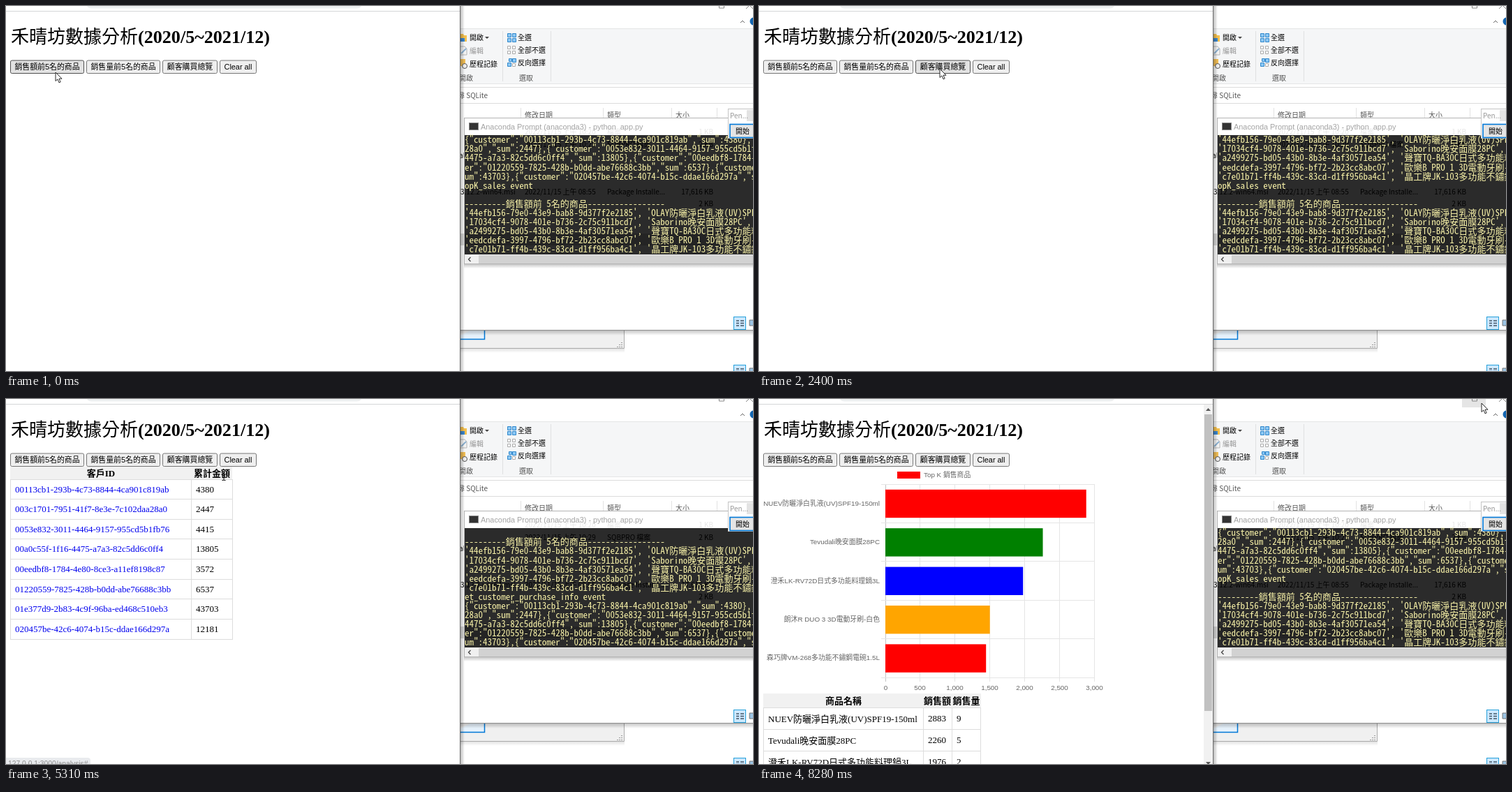
Animation, 1070 px wide and 523 px high, one loop 8.36 s. Source, as an HTML page:

```html
<!DOCTYPE html>
<html lang="zh-Hant">
<head>
<meta charset="utf-8">
<title>數據分析</title>
<style>
  html, body { margin: 0; width: 100%; height: 100%; overflow: hidden; background: #fff; }
  svg { display: block; width: 1070px; height: 523px; }
  text { white-space: pre; }
  .ui { font: 10px "Noto Sans CJK TC", "Noto Sans CJK", sans-serif; }
  .sans { font: 10.9px "Liberation Sans", "Noto Sans CJK TC", "Noto Sans CJK", sans-serif; }
  .axis { font: 9.85px "Liberation Sans", "Noto Sans CJK TC", "Noto Sans CJK", sans-serif; fill: #666; }
  .serif { font: 13px "Liberation Serif", "Noto Sans CJK TC", "Noto Sans CJK", serif; }
  .bold { font-weight: 700; }
  .mid { text-anchor: middle; }
  .end { text-anchor: end; }
  .term { font: 13.04px "Noto Sans Mono CJK TC", "Noto Sans Mono", monospace; fill: #f8f2a8; }
  .btn rect { fill: #efefef; stroke: #767676; }
  .btn.hover rect { fill: #e2e2e2; stroke: #4f4f4f; }
  .btn.active rect { fill: #f5f5f5; stroke: #8d8d8d; }
</style>
</head>
<body>
<svg id="stage" viewBox="0 0 1070 523" xmlns="http://www.w3.org/2000/svg">
  <defs>
    <linearGradient id="sideShade">
      <stop offset="0" stop-opacity=".3"/><stop offset="1" stop-opacity="0"/>
    </linearGradient>
    <linearGradient id="downShade" x2="0" y2="1">
      <stop offset="0" stop-opacity=".22"/><stop offset="1" stop-opacity="0"/>
    </linearGradient>
    <g id="viewIcon">
      <rect x=".5" y=".5" width="17" height="18" fill="#cce8ff" stroke="#26a0da"/>
      <path d="M4 6h4M4 9.500h4M4 13h4M10 6h5M10 9.500h5M10 13h5" stroke="#456" stroke-width="1.500"/>
      <path d="M23 5h9v8h-9z" fill="#9cc4e4" stroke="#777"/>
    </g>
  </defs>

  <!-- window behind -->
  <rect x="640" y="455" width="245" height="35" fill="#f0f0f0"/>
  <path d="M640 490.500H885.500V464" fill="none" stroke="#aaa"/>
  <rect x="640" y="491" width="246" height="6" fill="url(#downShade)" opacity=".5"/>
  <path d="M640 477.500H685.500V455" fill="#e5f1fb" stroke="#0078d7" stroke-width="1.500"/>
  <path d="M882 482v1M882 485v1M882 488v1M879 485v1M879 488v1M876 488v1" stroke="#999" stroke-width="2"/>
  <use href="#viewIcon" x="1042" y="514"/>

  <!-- file explorer -->
  <rect x="640" y="0" width="430" height="464" fill="#fff"/>
  <rect x="640" y="32" width="430" height="79" fill="#f5f6f7"/>
  <path d="M640 32.500h430M640 111.500h430" stroke="#e4e5e6"/>
  <path d="M640 116.500h430M640 139.500h430" stroke="#dcdcdc"/>
  <path d="M711.500 36v72M780.500 36v72" stroke="#dfe0e1"/>
  <path d="M737.500 146v16M855.500 146v16M953.500 146v16M1018.500 146v16" stroke="#e2e2e2"/>
  <rect id="maxHover" x="1007" y="0" width="34" height="12" fill="#e5e5e5"/>
  <path d="M1021.500 0v3h7V0M1060 4l4-4M1070 4l-4-4" fill="none" stroke="#888"/>
  <path d="M1052 24l3-3 3 3" fill="none" stroke="#666"/>
  <circle cx="1071" cy="22" r="5.500" fill="#1467b3"/>
  <path d="M650 40h5l1 2h4v9h-10z" fill="#f4c04e"/><path d="M651 46h6v5h-6z" fill="#3b87cf"/>
  <path d="M650 58h7l3 3v9h-10z" fill="#f3f3f3" stroke="#b5b5b5"/><path d="M652 68l7-7" stroke="#8bb0d0" stroke-width="2"/>
  <path d="M650 76h8v10h-8z" fill="#f0bd55"/><circle cx="657" cy="86" r="3.500" fill="#eee" stroke="#555"/>
  <path d="M686 44h6l-3 3z" fill="#444"/>
  <g fill="#8cc8f4" stroke="#3288cc">
    <path d="M718.500 39.500h5v5h-5zM725.500 39.500h5v5h-5zM718.500 46.500h5v5h-5zM725.500 46.500h5v5h-5z"/>
    <path d="M718.500 57.500h4v4h-4zM725.500 57.500h4v4h-4zM718.500 64.500h4v4h-4zM725.500 64.500h4v4h-4z" fill="#fff" stroke="#aaa"/>
    <path d="M720.500 75.500h4v4h-4zM725.500 75.500h5v5h-5zM718.500 81.500h5v5h-5z"/>
    <path d="M725.500 82.500h4v4h-4z" fill="#fff" stroke="#aaa"/>
  </g>
  <g id="explorerText"></g>
  <rect x="650" y="326" width="420" height="17" fill="#d9d9d9"/>
  <path d="M640 464.500h430" stroke="#8f8f8f"/>
  <rect x="640" y="465" width="430" height="7" fill="url(#downShade)"/>
  <use href="#viewIcon" x="1042" y="445"/>

  <!-- console -->
  <rect x="656" y="370" width="414" height="6" fill="url(#downShade)"/>
  <rect x="656.500" y="160.500" width="420" height="209" fill="none" stroke="#b4b4b4"/>
  <rect x="657" y="161" width="413" height="24" fill="#fff" opacity=".9"/>
  <rect x="657" y="185" width="413" height="171" opacity=".83"/>
  <rect x="657" y="356" width="413" height="13" fill="#f0f0f0"/>
  <rect x="677" y="357" width="393" height="12" fill="#d2d2d2"/>
  <path d="M665.500 360l-3 3 3 3" fill="none" stroke="#444" stroke-width="1.300"/>
  <rect x="663.500" y="167.500" width="13" height="10" fill="#333" stroke="#888"/>
  <text x="680" y="176.500" class="sans" fill="#a3a3a3">Anaconda Prompt (anaconda3) - python  app.py</text>
  <g id="console" class="term"></g>

  <!-- small dialog -->
  <rect x="1034.500" y="147.500" width="40" height="42" fill="#fff" stroke="#c4c4c4"/>
  <rect x="1061" y="149" width="9" height="16" fill="#e3e3e3"/>
  <rect x="1037" y="169.500" width="40" height="19" fill="#e5e5e5" stroke="#0078d7" stroke-width="1.600"/>
  <text x="1037" y="161" class="ui" fill="#999">Pen...</text>
  <text x="1045" y="183" class="ui">開始</text>

  <!-- browser -->
  <rect x="650" y="0" width="7" height="523" fill="url(#sideShade)"/>
  <rect width="650" height="523" fill="#fff"/>
  <path d="M650.500 0v523" stroke="#6a6a6a"/>
  <path d="M116 0h393q-2 3.500-7 3.500H123q-5 0-7-3.500z" fill="#eef0f1"/>
  <path d="M0 7.500h650" stroke="#d5d6d8"/>
  <text x="7" y="53" font-size="26" font-weight="500" font-family="'Noto Sans CJK TC','Noto Sans CJK',sans-serif">禾晴坊數據分析</text>
  <text x="189" y="53" font-size="26.100" font-weight="700" font-family="'Liberation Serif',serif">(2020/5~2021/12)</text>
  <g id="buttons"></g>
  <g id="report">
    <rect x="637" y="8" width="12.500" height="515" fill="#f1f1f1"/>
    <rect x="638" y="22" width="11" height="425" fill="#c1c1c1"/>
    <path d="M640 17h7l-3.500-4zM640 520h7l-3.500 4z" fill="#555"/>
    <g id="chart"></g>
  </g>
  <g id="customers"></g>
  <rect id="flash" x="75" y="97" width="106" height="21" rx="4" opacity=".2"/>
  <g id="status">
    <path d="M0 514h117q4 0 4 4v5H0z" fill="#dee1e6"/>
    <text x="3" y="526" class="sans" style="font-size:10.300px" fill="#555">127.0.0.1:3000/analysis#</text>
  </g>

  <g id="cursor">
    <circle id="halo" cx="0" cy="2" r="10.500" fill="#f2ee22" opacity=".7"/>
    <path id="arrow" d="M0 0V12.500L2.900 9.900 5 14.800 7.100 13.900 5 9.200H9z" fill="#fff" stroke="#111" stroke-width=".9"/>
    <path id="hand" d="M-1.500 1.200Q-1.500-.5 0-.5T1.500 1.200V6.500Q3.500 5.500 4.200 7 6 6.300 6.700 8 8.500 7.500 8.800 9V13Q8.500 16 7 18.500H0Q-2-15.500-5 10.500-4.500 8-1.500 10.500z" fill="#fff" stroke="#111"/>
    <path id="beam" d="M-2.500-4.500H-.5L0-4 .5-4.500H2.500M0-4V4M-2.500 4.500H-.5L0 4 .5 4.500H2.500" fill="none" stroke="#111"/>
  </g>
</svg>

<script>
const LOOP = 8360;
const $ = id => document.getElementById(id);
const text = (x, y, s, cls, attrs = '') => `<text x="${x}" y="${y}" class="${cls}" ${attrs}>${s}</text>`;
const rect = (x, y, w, h, attrs) => `<rect x="${x}" y="${y}" width="${w}" height="${h}" ${attrs}/>`;
const line = (d, color) => `<path d="${d}" stroke="${color}" fill="none"/>`;
const show = (id, on) => $(id).setAttribute('visibility', on ? 'visible' : 'hidden');

// Explorer labels and the file rows showing through the console
const gray = 'fill="#555"';
const row = (y, date, type, size) =>
  text(743, y, date, 'ui') + text(861, y, type, 'ui') + text(1013, y, size, 'ui end');
$('explorerText').innerHTML = [
  [664, 49, '開啟'], [664, 68, '編輯', 'fill="#999"'], [664, 87, '歷程記錄'], [649, 106.5, '開啟', gray],
  [733, 48.5, '全選'], [733, 66.5, '全部不選'], [733, 84.5, '反向選擇'], [735, 106.5, '選取', gray],
  [647, 132, '尋 SQLite', gray], [743, 160, '修改日期', gray], [861, 160, '類型', gray], [959, 160, '大小', gray],
  [649, 218, 'al'], [651, 269.5, '3.12.2-win64.msi']
].map(([x, y, s, a]) => text(x, y, s, 'ui', a)).join('') +
  row(184, '2022/11/15 上午 10:20', '檔案', '1 KB') +
  row(201.5, '2022/11/15 上午 10:29', 'SQBPRO 檔案', '2 KB') +
  row(269.5, '2022/11/15 上午 08:55', 'Package Installe...', '17,616 KB') +
  row(287, '', '', '2 KB');

// Console log, seen through a window of 13 lines
const sales = ['opK_sales event', '', '-'.repeat(9) + '銷售額前 5名的商品' + '-'.repeat(17),
  "'44efb156-79e0-43e9-bab8-9d377f2e2185', 'OLAY防曬淨白乳液(UV)SPF19",
  "'17034cf4-9078-401e-b736-2c75c911bcd7', 'Saborino晚安面膜28PC', ",
  "'a2499275-bd05-43b0-8b3e-4af30571ea54', '聲寶TQ-BA30C日式多功能料",
  "'eedcdefa-3997-4796-bf72-2b23cc8abc07', '歐樂B PRO 1 3D電動牙刷-",
  "'c7e01b71-ff4b-439c-83cd-d1ff956ba4c1', '晶工牌JK-103多功能不鏽鋼"];
const purchases = [
  '{"customer":"00113cb1-293b-4c73-8844-4ca901c819ab","sum":4380},',
  '28a0","sum":2447},{"customer":"0053e832-3011-4464-9157-955cd5b1f',
  '4475-a7a3-82c5dd6c0ff4","sum":13805},{"customer":"00eedbf8-1784-',
  'er":"01220559-7825-428b-b0dd-abe76688c3bb","sum":6537},{"custome',
  'um":43703},{"customer":"020457be-42c6-4074-b15c-ddae166d297a","s'];
const log = [...purchases, ...sales, ...sales, 'et_customer_purchase_info event', ...purchases, ...sales];
let logStart = -1;
function scrollLog(start) {
  if (start === logStart) return;
  logStart = start;
  $('console').innerHTML = log.slice(start, start + 13)
    .map((s, i) => text(657, 196.3 + i * 13.08, s, '')).join('');
}

// Toolbar buttons
const buttons = [[6, 106, '銷售額前5名的商品'], [115, 106, '銷售量前5名的商品'], [224, 79, '顧客購買總覽'], [306, 53, 'Clear all']];
$('buttons').innerHTML = buttons.map(([x, w, s]) =>
  `<g class="btn">${rect(x + .5, 78, w - 1, 18.5, 'rx="2"')}${text(x + w / 2, 91.2, s, 'sans mid')}</g>`).join('');
const buttonNodes = [...$('buttons').children];

// Bar chart and product table
const UNIT = .0998, BAND = 55.4;
const products = [
  ['NUEV防曬淨白乳液(UV)SPF19-150ml', 2883, 9, 'red'], ['Tevudali晚安面膜28PC', 2260, 5, 'green'],
  ['澄禾LK-RV72D日式多功能料理鍋3L', 1976, 2, 'blue'], ['朗沐R DUO 3 3D電動牙刷-白色', 1500, 1, 'orange'],
  ['森巧牌VM-268多功能不鏽鋼電碗1.5L', 1445, 1, 'red']];
let chart = rect(198, 104, 33, 10, 'fill="red"') + text(236, 112, 'Top K 銷售商品', 'axis');
for (let i = 0; i <= 6; i++) {
  const x = Math.floor(181 + i * 500 * UNIT) + .5;
  chart += line(`M${x} 122V405`, i ? '#e5e5e5' : '#c4c4c4') +
    text(x, 416.7, (i * 500).toLocaleString('en-US'), 'axis mid');
}
for (let i = 0; i <= 5; i++) chart += line(`M175 ${Math.floor(122 + i * BAND) + .5}H480`, '#e5e5e5');
chart += products.map(([name, , , color], i) =>
  rect(181, 129.8 + i * BAND, 0, 40.4, `fill="${color}" class="bar"`) +
  text(173, 152.8 + i * BAND, name, 'axis end')).join('');
chart += rect(6, 422, 312, 20, 'fill="#f1f1f1"') + text(121, 437, '商品名稱', 'serif bold mid') +
  text(255.5, 437, '銷售額', 'serif bold mid') + text(297, 437, '銷售量', 'serif bold mid') +
  line('M6.5 442V523M235.500 442V523M276.500 442V523M317.500 442V523', '#ddd');
chart += products.slice(0, 3).map(([name, sum, n], i) => {
  const y = 442.5 + i * 31;
  return line(`M6 ${y}H318`, '#ddd') + text(13, y + 20, name, 'serif') +
    text(242, y + 19, sum, 'serif') + text(283, y + 19, n, 'serif');
}).join('');
$('chart').innerHTML = chart;
const bars = [...document.querySelectorAll('.bar')];

// Customer table
const customers = [
  ['00113cb1-293b-4c73-8844-4ca901c819ab', 4380], ['003c1701-7951-41f7-8e3e-7c102daa28a0', 2447],
  ['0053e832-3011-4464-9157-955cd5b1fb76', 4415], ['00a0c55f-1f16-4475-a7a3-82c5dd6c0ff4', 13805],
  ['00eedbf8-1784-4e80-8ce3-a11ef8198c87', 3572], ['01220559-7825-428b-b0dd-abe76688c3bb', 6537],
  ['01e377d9-2b83-4c9f-96ba-ed468c510eb3', 43703], ['020457be-42c6-4074-b15c-ddae166d297a', 12181]];
$('customers').innerHTML = rect(6, 97, 318, 18, 'fill="#f1f1f1"') +
  text(136, 111, '客戶ID', 'serif bold mid') + text(295, 111, '累計金額', 'serif bold mid') +
  line('M6.5 115V344M265.500 115V344M324.500 115V344M6 344.500H325', '#ddd') +
  customers.map(([id, sum], i) => {
    const y = Math.floor(115 + i * 28.6) + .5;
    return line(`M6 ${y}H325`, '#ddd') + text(13, y + 18.3, id, 'serif', 'fill="#00e"') +
      text(272, y + 18.3, sum, 'serif');
  }).join('');

// Pointer: time, x, y
const path = [
  [0, 71, 95], [70, 71, 95], [150, 69, 87], [230, 69, 85], [520, 69, 85], [1140, 288, 88], [1220, 288, 88],
  [1300, 312, 87], [1460, 325, 84], [1620, 340, 85], [2200, 340, 85], [2400, 259, 90], [3300, 259, 90],
  [3560, 352, 100], [3860, 192, 135], [3920, 190, 135], [4000, 175, 135], [4110, 172, 134], [4480, 130, 130], [4640, 130, 130],
  [5300, 312, 112], [5540, 313, 112], [5800, 335, 86], [5980, 335, 86], [6300, 205, 88], [6600, 70, 86],
  [6750, 69, 84], [7040, 69, 84], [7740, 940, 510], [7840, 940, 510], [8270, 1035, 6], [LOOP, 1035, 6]];
function pointer(t) {
  const i = path.findIndex(p => p[0] > t);
  const [t0, x0, y0] = path[i - 1], [t1, x1, y1] = path[i];
  const u = (t - t0) / (t1 - t0), k = u * u * (3 - 2 * u);
  return [x0 + (x1 - x0) * k, y0 + (y1 - y0) * k];
}

const CLICKS = [230, 1850, 3020, 6760];
const FIRST = 310, CLEAR = 1890, LIST = 3100, CLEAR_LIST = 5930, SECOND = 6920;
const between = (t, a, b) => t >= a && t < b;

function draw(t) {
  const again = t >= SECOND, listed = between(t, LIST, CLEAR_LIST);
  scrollLog(again ? 22 : t >= LIST ? 14 : t >= FIRST ? 8 : 0);
  show('report', again || between(t, FIRST, CLEAR));
  show('customers', listed);
  show('flash', between(t, 3790, 3950));

  const u = Math.min(1, Math.max(0, (t - (again ? SECOND : FIRST)) / 950));
  const grow = 1 - (1 - u) ** 4;
  bars.forEach((b, i) => b.setAttribute('width', products[i][1] * UNIT * grow));

  const fade = Math.min((t - 4080) / 150, (5470 - t) / 240, 1);
  $('status').setAttribute('opacity', Math.max(0, fade));

  const [x, y] = pointer(t);
  const pressed = CLICKS.some(c => between(t, c, c + 150));
  buttonNodes.forEach((b, i) => {
    const [bx, w] = buttons[i];
    const over = x >= bx && x < bx + w && y >= 77 && y < 97;
    b.setAttribute('class', 'btn' + (over ? pressed ? ' active' : ' hover' : ''));
  });
  const inTable = listed && x > 6 && x < 325 && y > 97 && y < 344;
  const kind = !inTable ? 'arrow' : x < 238 && y > 122 ? 'hand' : 'beam';
  for (const k of ['arrow', 'hand', 'beam']) show(k, k === kind);
  show('halo', pressed);
  show('maxHover', x > 1007 && x < 1041 && y < 12);
  $('cursor').setAttribute('transform', `translate(${x} ${y})`);
}

function tick() {
  draw(performance.now() % LOOP);
  requestAnimationFrame(tick);
}
tick();
</script>
</body>
</html>
```
